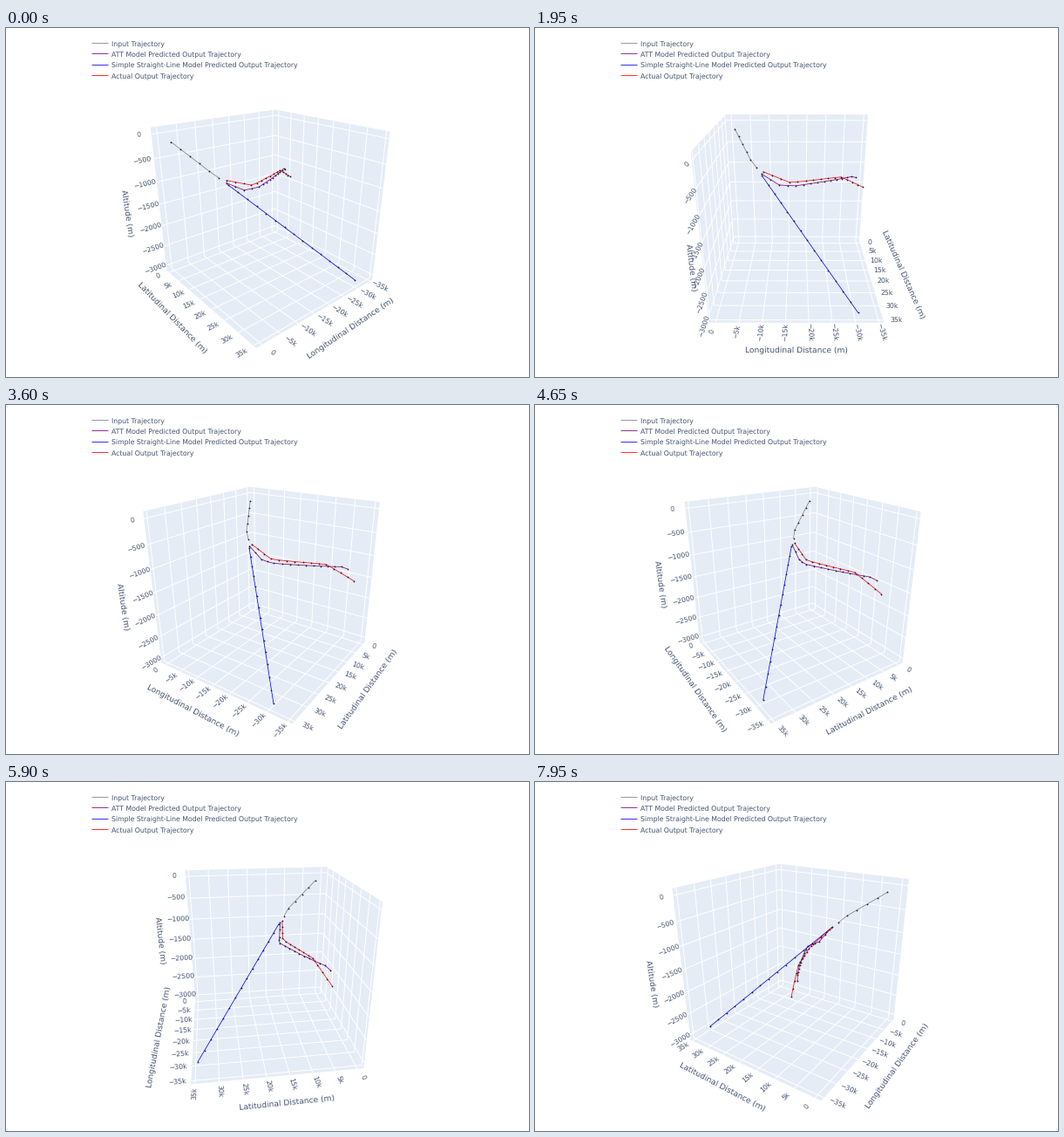
Write a matplotlib script that moves like this. It is 600 px wide and 400 px high and loops after 8 s.

```python
import numpy as np
import matplotlib.pyplot as plt
from matplotlib.animation import FuncAnimation
from matplotlib.collections import LineCollection, PolyCollection

W, H, DPI = 600, 400, 100
FRAMES, INTERVAL = 160, 50
PX = 72 / DPI
INK, PANEL = "#43536f", "#e5ecf6"

# Camera: focal length in px, distance, elevation, screen centre
FOCAL, DIST = 460, 2.56
SIN_E = 0.39
COS_E = np.sqrt(1 - SIN_E ** 2)
CX, CY = 300, 206
YAW0, YAW_STEP = -85.2, 1.035

# Label distance from the box, in box widths
TICK_GAP, TITLE_GAP = 0.08, 0.225

plt.rcParams["font.family"] = "DejaVu Sans"
plt.rcParams["text.hinting"] = "no_hinting"

# Box corners (latitude, longitude), each one quarter turn apart
turns = np.radians(135 - 90 * np.arange(4))
CORNERS = np.sqrt(0.5) * np.column_stack([np.cos(turns), np.sin(turns)])


def kilo(v):
    return f"{v}k" if v else "0"


def make_axis(title, values, low, high, fmt):
    return {
        "title": title,
        "at": (values - low) / (high - low) - 0.5,
        "names": [fmt(v).replace("-", "\u2212") for v in values],
    }


AXES = [
    make_axis("Latitudinal Distance (m)", np.arange(0, 36, 5),
              -1.4, 35.8, kilo),
    make_axis("Longitudinal Distance (m)", -np.arange(0, 36, 5),
              -36.0, 1.4, kilo),
    make_axis("Altitude (m)", -np.arange(0, 3001, 500), -3124, 130, str),
]
LAT, LON, ALT = range(3)


def straight(start, end, count):
    return np.linspace(start, end, count)


def bend(t, level, knee, before, after, knee2=None):
    """Two slopes joined at a knee, or by a flat stretch up to knee2."""
    knee2 = knee if knee2 is None else knee2
    return (level + before * np.maximum(knee - t, 0)
            + after * np.maximum(t - knee2, 0))


def input_track():
    line = straight((-.400, .426, .419), (-.189, .303, .262), 5)
    return np.vstack([line, (-.151, .261, .220)])


def predicted_track():
    t = np.linspace(0, 1, 15)
    return np.column_stack([
        bend(t, -.075, .27, -.16, -.29),
        .228 - .83 * t + .19 * t ** 2,
        bend(t, .12, .143, .47, -.2, .93),
    ])


def actual_track():
    t = np.linspace(0, 1, 15)
    return np.column_stack([
        bend(t, -.105, .21, -.12, -.24, .25),
        .217 - .83 * t + .15 * t ** 2,
        bend(t, .135, .21, .3, -.34, .71),
    ])


TRACKS = [
    ("Input Trajectory", "gray", input_track()),
    ("ATT Model Predicted Output Trajectory", "purple", predicted_track()),
    ("Simple Straight-Line Model Predicted Output Trajectory", "blue",
     straight((-.109, .223, .177), (.463, -.356, -.460), 15)),
    ("Actual Output Trajectory", "red", actual_track()),
]


def project(points, yaw):
    """Screen positions of box points (lat, lon, alt) seen at this yaw."""
    p, q, z = np.moveaxis(np.asarray(points, float), -1, 0)
    a, b = -(p + q) / np.sqrt(2), (q - p) / np.sqrt(2)
    c, s = np.cos(np.radians(yaw)), np.sin(np.radians(yaw))
    side, deep = a * c + b * s, b * c - a * s
    w = DIST + COS_E * deep - SIN_E * z
    x = CX + FOCAL * side / w
    y = CY - FOCAL * (COS_E * z + SIN_E * deep) / w
    return np.stack([x, y], axis=-1)


def upright(d):
    """Text angle along a screen direction, kept readable."""
    angle = -np.degrees(np.arctan2(d[1], d[0]))
    return (angle + 90) % 180 - 90


fig = plt.figure(figsize=(W / DPI, H / DPI), dpi=DPI, facecolor="white")
ax = fig.add_axes([0, 0, 1, 1])
ax.set_xlim(0, W)
ax.set_ylim(H, 0)
ax.axis("off")

panels = ax.add_collection(
    PolyCollection([], facecolors=PANEL, edgecolors=PANEL, linewidths=0.3))
grid = ax.add_collection(
    LineCollection([], colors="white", linewidths=PX))

curves = []
for i, (name, color, _) in enumerate(TRACKS):
    line, = ax.plot([], [], color=color, lw=0.75 * PX)
    dots, = ax.plot([], [], "o", ms=1.8 * PX, mfc="#202030", mec="none")
    curves.append((line, dots))
    y = 16.9 + 12.4 * i
    ax.plot([98, 117], [y, y], color=color, lw=PX, alpha=0.8,
            solid_capstyle="butt")
    ax.text(121, y, name, size=7.8 * PX, color=INK, va="center_baseline")


def label(text, size):
    return ax.text(0, 0, text, size=size * PX, color=INK, ha="center",
                   va="center", rotation_mode="anchor")


for axis in AXES:
    axis["ticks"] = [label(s, 7.8) for s in axis["names"]]
    axis["heading"] = label(axis["title"], 9.1)


def edge_points(index, corner, values):
    """Points along an axis through a floor corner."""
    pts = np.tile((*corner, -0.5), (len(values), 1))
    pts[:, index] = values
    return pts


def place_axis(index, corner, out, yaw):
    axis = AXES[index]
    out = np.array([*out, 0.0])
    base = edge_points(index, corner, axis["at"])
    spots = project(base + TICK_GAP * out, yaw)
    ahead = project(base + (TICK_GAP + 0.02) * out, yaw)
    for text, pos, nxt in zip(axis["ticks"], spots, ahead):
        text.set_position(pos)
        text.set_rotation(upright(nxt - pos))

    mid = edge_points(index, corner, [-0.05, 0, 0.05]) + TITLE_GAP * out
    low, pos, high = project(mid, yaw)
    axis["heading"].set_position(pos)
    axis["heading"].set_rotation(upright(high - low))


def wall(c, d):
    return [(*c, -.5), (*d, -.5), (*d, .5), (*c, .5)]


def grid_lines(back):
    """Each tick value drawn across the two panels it meets."""
    anchor = np.array([*back, -0.5])
    lines = []
    for index, axis in enumerate(AXES):
        for value in axis["at"]:
            for across in {LAT, LON, ALT} - {index}:
                ends = np.tile(anchor, (2, 1))
                ends[:, index] = value
                ends[:, across] = -0.5, 0.5
                lines.append(ends)
    return lines


def draw(n):
    yaw = YAW0 + YAW_STEP * n
    k = int(np.round(yaw / 90))
    back, left, front, right = (CORNERS[(k + i) % 4] for i in range(4))

    floor = [(*c, -.5) for c in CORNERS]
    faces = [floor, wall(back, left), wall(back, right)]
    panels.set_verts(list(project(faces, yaw)))
    grid.set_segments(list(project(grid_lines(back), yaw)))

    for pair, (_, _, pts) in zip(curves, TRACKS):
        for curve in pair:
            curve.set_data(*project(pts, yaw).T)

    # Every second quarter turn the floor axes swap sides
    near, far = (LON, LAT) if k % 2 else (LAT, LON)
    if abs(left[near] - front[near]) < 0.5:
        near, far = far, near
    place_axis(ALT, left, left - back, yaw)
    place_axis(near, front, left - back, yaw)
    place_axis(far, front, front - left, yaw)
    return []


anim = FuncAnimation(fig, draw, frames=FRAMES, interval=INTERVAL,
                     init_func=lambda: draw(0), repeat=True, repeat_delay=0)
plt.show()
```
